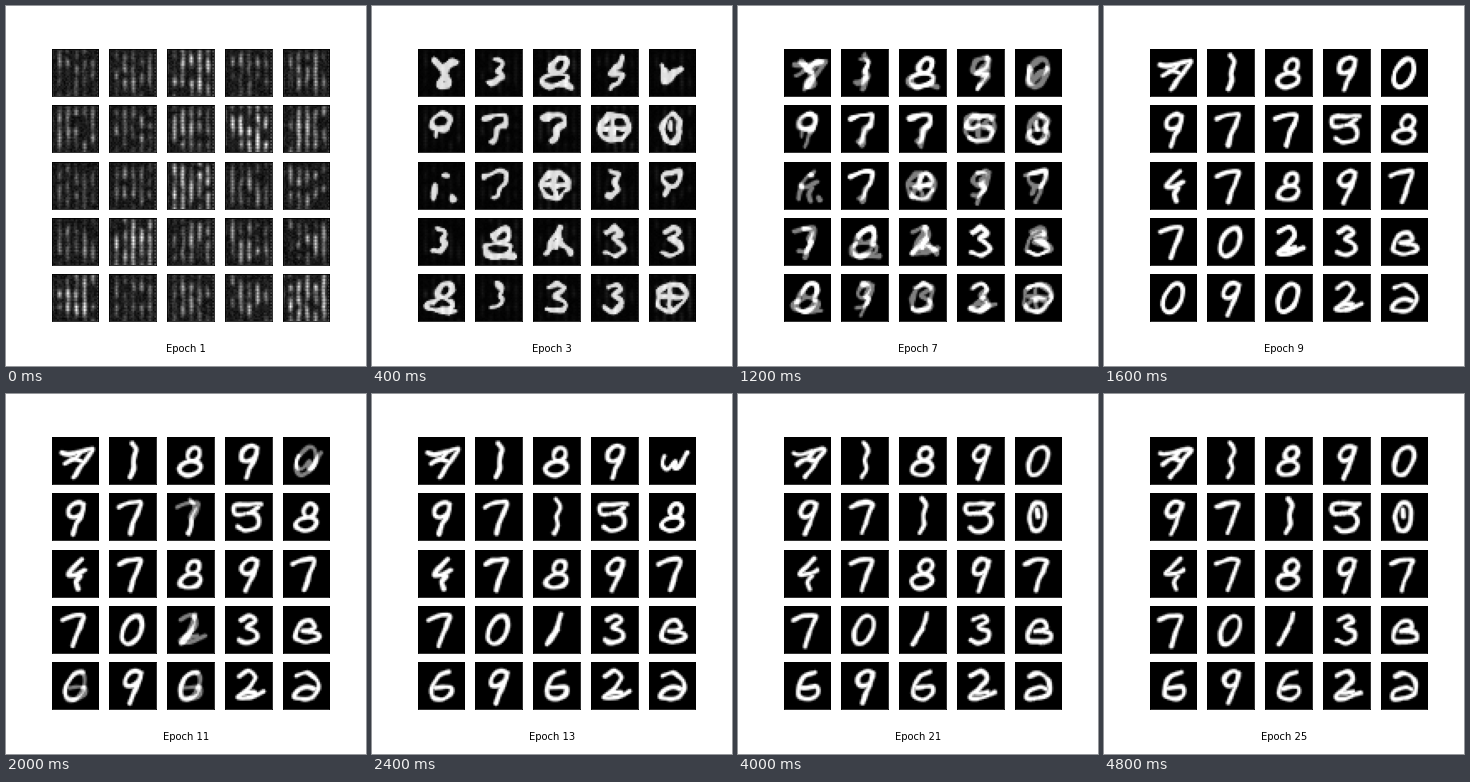
These frames come from a looping animation (360x360 px, 5 s). A matplotlib script:

```python
import matplotlib.pyplot as plt
import numpy as np
from matplotlib.animation import FuncAnimation

EPOCHS = 25
SIZE = 28      # pixels along one side of a sample
CELL = 46.9    # units along one side in the stroke coordinates
axis = (np.arange(SIZE) + 0.5) * CELL / SIZE
GX, GY = np.meshgrid(axis, axis)
ROWS, COLS = np.arange(SIZE)[:, None], np.arange(SIZE)[None, :]


def arc(cx, cy, rx, ry, lean=0.2):
    """Closed oval whose top leans to the right."""
    t = np.linspace(0, 2 * np.pi, 60)
    return np.column_stack([cx + rx * np.cos(t) - lean * ry * np.sin(t), cy + ry * np.sin(t)])


def curve(*flat, count=60):
    """Smooth stroke through x, y, x, y, ..."""
    pts = np.array(flat, float).reshape(-1, 2)
    pad = np.vstack([pts[0], pts, pts[-1]])
    t = np.linspace(0, len(pts) - 1, count)
    i = np.minimum(t.astype(int), len(pts) - 2)
    u = (t - i)[:, None]
    a, b, c, d = (pad[i + k] for k in range(4))
    return 0.5 * (2 * b + (c - a) * u + (2 * a - 5 * b + 4 * c - d) * u**2
                  + (3 * b - a - 3 * c + d) * u**3)


GLYPHS = {
    "0": [arc(23, 24, 9, 14, 0.3)],
    "O": [arc(22.5, 23.5, 8, 14, 0.05), curve(22, 17, 23, 24)],
    "1": [curve(23, 6, 27, 13, 24, 23, 25, 32, 21, 40)],
    "/": [curve(28, 8, 25, 18, 20, 28, 14, 38), curve(24, 23, 16, 36)],
    "2": [curve(14, 14, 24, 9, 30, 16, 23, 26, 13, 35, 23, 36, 38, 30), curve(18, 31, 30, 30)],
    "3": [curve(16, 14, 25, 10, 30, 15, 22, 21, 31, 26, 31, 33, 22, 37, 14, 34)],
    "4": [curve(30, 9, 24, 15, 16, 24, 25, 24, 33, 20), curve(28, 26, 24, 32, 26, 39)],
    "5": [curve(36, 11, 24, 11, 10, 12, 11, 21, 28, 20, 34, 27, 31, 35, 20, 38, 13, 34),
          curve(33, 14, 25, 20)],
    "6": [curve(31, 10, 21, 14, 15, 24, 15, 34, 25, 37, 33, 32, 32, 25, 18, 26)],
    "7": [curve(10, 14, 20, 10, 31, 10, 29, 18, 25, 28, 21, 40)],
    "F": [curve(10, 16, 18, 17, 40, 12, 34, 22, 28, 31, 21, 40), curve(13, 27, 22, 22, 32, 25),
          curve(29, 15, 23, 22)],
    "8": [arc(26.5, 17, 6, 6.5), arc(23, 31, 10, 7, 0.25)],
    "9": [arc(24, 16.5, 7, 7.5, 0.35), curve(32, 11, 29, 22, 25, 31, 21, 41)],
    "A": [arc(26, 17, 7, 7), arc(22, 31, 13, 6.5, 0.4), curve(28, 37, 38, 37)],
    "P": [arc(23, 17, 9, 8), curve(18, 26, 17, 31)],
    "#": [arc(22.5, 23, 13.5, 13), curve(22, 10, 21, 23, 23, 36), curve(9, 23, 22, 23, 36, 22)],
    "?": [curve(10, 15, 18, 10, 29, 10, 31, 18, 24, 24, 22, 32, 18, 37)],
    "J": [curve(20, 10, 27, 13, 24, 21, 27, 27, 21, 33, 15, 33)],
    "Y": [curve(17, 13, 23, 20, 28, 27, 22, 36, 30, 35, 27, 24, 36, 12), curve(24, 19, 35, 12)],
    "V": [curve(14, 18, 16, 34, 22, 29, 31, 20), curve(17, 22, 19, 29, 25, 23)],
    "N": [curve(26, 9, 21, 20, 12, 36), curve(25, 11, 28, 24, 37, 36), curve(22, 28, 28, 22)],
    "z": [curve(30, 9, 27, 18, 21, 25, 30, 26, 27, 33, 20, 40)],
    "u": [curve(15, 19, 14, 28, 19, 32, 26, 24, 25, 31, 30, 29, 38, 16)],
    "a": [curve(14, 14, 24, 11, 34, 19, 34, 30, 26, 36, 12, 36, 14, 29, 24, 25, 31, 27)],
    "e": [curve(20, 25, 31, 22, 28, 15, 20, 16, 14, 24, 13, 33, 23, 36, 35, 33, 34, 27, 20, 25)],
    ":": [curve(27, 13, 28, 14), curve(17, 24, 14, 36), curve(34, 36, 35, 38)],
}
# What each cell of the grid resembles from a given epoch on.
STAGES = {
    5: ["YJAzV", "P??#O", ":?#JP", "JAN33", "AJ33#"],
    9: ["F1890", "97758", "47897", "7023e", "0902a"],
    13: ["F189u", "97158", "47897", "70/3e", "6962a"],
    17: ["F1890", "9715O", "47897", "70/3e", "6962a"],
}


def smooth_noise(rng, knots):
    """Bilinear noise field in -1..1."""
    pos = np.linspace(0, knots - 1, SIZE)[:, None]
    weight = np.clip(1 - abs(pos - np.arange(knots)), 0, 1)
    return weight @ rng.uniform(-1, 1, (knots, knots)) @ weight.T


def drifting_noise(rng, knots, epoch):
    """Noise field that turns slowly into another one."""
    angle = 0.25 * epoch
    return (np.cos(angle) * smooth_noise(rng, knots)
            + np.sin(angle) * smooth_noise(rng, knots))


def draw_ink(name, row, col, epoch):
    """Ragged strokes that become cleaner as training goes on."""
    rng = np.random.default_rng(5 * row + col)
    early = np.clip((9 - epoch) / 4, 0, 1.5)
    warp = 0.8 + 1.6 * early
    gx = GX + warp * drifting_noise(rng, 7, epoch)
    gy = GY + warp * drifting_noise(rng, 7, epoch)
    width = 2.3 + 0.4 * early + (0.5 + 0.5 * early) * drifting_noise(rng, 8, epoch)
    x, y = np.concatenate(GLYPHS[name]).T
    dist = np.hypot(gx[..., None] - x, gy[..., None] - y).min(axis=-1)
    return np.clip((width - dist) / 2 + 0.5, 0, 1)


def blended_ink(row, col, epoch):
    """Fade from one stage to the next, keeping the contrast high."""
    epoch = max(epoch, min(STAGES))
    start = max(k for k in STAGES if k <= epoch)
    end = min((k for k in STAGES if k > epoch), default=start)
    old, new = STAGES[start][row][col], STAGES[end][row][col]
    ink = draw_ink(old, row, col, epoch)
    if old != new:
        f = (epoch - start) / (end - start)
        ink = (1 - f) * ink + f * draw_ink(new, row, col, epoch)
        ink = ink * ink * (3 - 2 * ink)
    return ink


def stripes(row, col):
    """Upsampling artefacts of the untrained generator, stronger under larger shapes."""
    rng = np.random.default_rng(40 + 5 * row + col)
    shape = draw_ink(STAGES[5][row][col], row, col, 1)
    gain = np.clip(0.3 + 1.5 * shape.mean(), 0, 0.9)
    bars = (0.5 + 0.5 * np.cos(2 * np.pi * (COLS - 4) / 5)) ** 1.5
    edge = np.exp(-(((ROWS - 14) / 12) ** 6) - ((COLS - 14) / 13) ** 6)
    window = edge + (1 - edge) * gain**2
    blobs = np.clip(0.4 + 0.8 * smooth_noise(rng, 8) + 0.2 * shape, 0, 1)
    ladder = 0.75 + 0.25 * (ROWS % 2)
    grain = 0.02 + 0.12 * rng.random((SIZE, SIZE))
    image = grain + gain * (0.08 + 1.1 * blobs) * (0.08 + bars) * window * ladder
    image[:, -1] += 0.3 * gain * (ROWS[:, 0] % 2)
    return np.clip(image, 0, 1)


def sample(row, col, epoch):
    untrained = 1 if epoch == 1 else 0.4 ** (epoch - 1) * (epoch < 5)
    ink = 0 if epoch == 1 else blended_ink(row, col, epoch)
    return (1 - untrained) * ink + untrained * stripes(row, col)


fig, axes = plt.subplots(5, 5, figsize=(5, 5), dpi=72)
fig.subplots_adjust(left=0.125, right=0.9, bottom=0.125, top=0.88)
images = {}
for (row, col), ax in np.ndenumerate(axes):
    ax.set_xticks([])
    ax.set_yticks([])
    images[row, col] = ax.imshow(np.zeros((SIZE, SIZE)), cmap="gray", vmin=0, vmax=1)
label = fig.text(0.5, 0.04, "", ha="center", fontsize=10)


def update(frame):
    epoch = frame + 1
    for (row, col), image in images.items():
        image.set_data(sample(row, col, epoch))
    label.set_text(f"Epoch {epoch}")
    return [*images.values(), label]


anim = FuncAnimation(fig, update, frames=EPOCHS, interval=200, repeat=True, repeat_delay=0)
plt.show()
```
